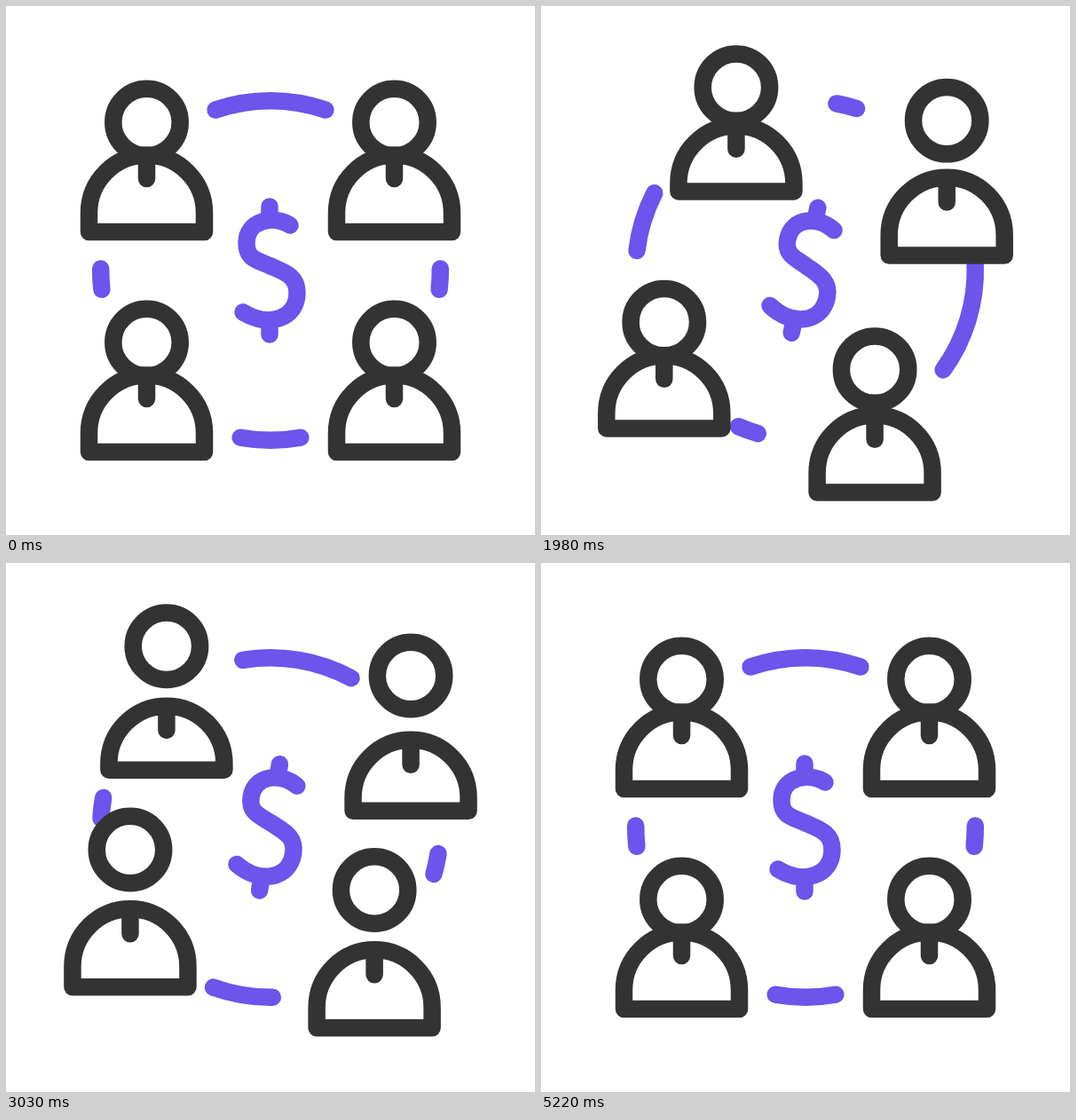
These frames come from a looping animation (596 px wide and 596 px high, 5.4 s). An HTML page with a canvas:

```html
<!DOCTYPE html>
<html lang="en">
<head>
<meta charset="utf-8">
<title>Money circle</title>
<style>
html, body { margin: 0; width: 100%; height: 100%; overflow: hidden; background: #fff; }
canvas { display: block; }
</style>
</head>
<body>
<canvas id="stage" width="596" height="596"></canvas>
<script>
const ctx = document.getElementById('stage').getContext('2d');
const SIZE = 596, MID = SIZE / 2, LOOP = 5400, STEP = 30, LAG = 300, RAD = Math.PI / 180;
const DARK = '#333333', PURPLE = '#6c54ec';

// Bezier ease with flat ends; x1 and x2 are the handle positions in time.
const ease = (x1, x2) => x => {
  let lo = 0, hi = 1;
  for (let i = 0; i < 24; i++) {
    const s = (lo + hi) / 2, r = 1 - s;
    if (3 * x1 * s * r * r + 3 * x2 * s * s * r + s * s * s < x) lo = s;
    else hi = s;
  }
  return lo * lo * (3 - 2 * lo);
};
const soft = ease(1 / 3, 2 / 3), spin = ease(.543, .581), settle = ease(.33, .45), drop = ease(.527, .862);

// Progress from 0 to 1 between two times.
const ramp = (t, from, to, curve = soft) => curve(Math.min(1, Math.max(0, (t - from) / (to - from))));

// The ring winds up, makes a full turn, overshoots and returns.
const ringAngle = t =>
  -22 * ramp(t, 0, 900) + 403.8 * ramp(t, 900, 3320, spin) - 21.8 * ramp(t, 3320, 4200);

// The dollar sign rocks from side to side, a little less each time.
function swingAngle(t) {
  const first = 1060, half = 680, count = 4;
  const peak = n => n < 0 || n >= count ? 0 : (n % 2 ? 1 : -1) * (30 - 6.7 * n);
  if (t < first) return peak(0) * ramp(t, 0, first);
  const n = Math.floor((t - first) / half), from = first + n * half;
  return peak(n) + (peak(n + 1) - peak(n)) * ramp(t, from, from + half);
}

// Each person crouches, jumps up, lands and makes a smaller second hop.
const crouch = (t, height, from, low, to) => height * (ramp(t, from, low) - ramp(t, low, to, settle));
const squash = t => crouch(t, 14, 0, 900, 1800) + crouch(t, 15.3, 2420, 3020, 3800);
const headLift = t =>
  -7.5 * ramp(t, 750, 1200) + 39.3 * ramp(t, 1200, 2250, settle) - 30.3 * ramp(t, 2500, 3300, drop)
  + 20.5 * ramp(t, 3300, 3880) - 22 * ramp(t, 3880, 4320, drop);

const dollar = new Path2D('M22-51C2-63-27-56-27-31C-27-13-16-12 0-5C16 2 30 6 30 25C30 54-2 65-31 47' +
  'M-1-72V-57M-1 56V72');

function dash(mid, half, turn) {
  ctx.beginPath();
  ctx.arc(MID, MID, 191.3, (mid - half) * RAD + turn, (mid + half) * RAD + turn);
  ctx.stroke();
}

// x, y is the middle of the base line.
function person(x, y, t) {
  const lift = headLift(t), squeeze = squash(t);
  const leg = 21.5 - squeeze + .05 * lift;
  ctx.save();
  ctx.translate(x, y);
  ctx.stroke(new Path2D(`M-65 0V${-leg}A65 65 0 0 1 65 ${-leg}V0ZM0 ${-leg - 65}V${squeeze - 60}`));
  ctx.beginPath();
  ctx.arc(0, -123.5 - lift, 37.7, 0, 2 * Math.PI);
  ctx.stroke();
  ctx.restore();
}

function draw(t) {
  const turn = ringAngle(t) * RAD, c = Math.cos(turn), s = Math.sin(turn);
  ctx.clearRect(0, 0, SIZE, SIZE);
  ctx.lineWidth = 19.5;
  ctx.lineCap = ctx.lineJoin = 'round';

  ctx.strokeStyle = PURPLE;
  dash(-90, 18.9, turn);
  dash(2.9, 3.5, turn);
  dash(90, 10.2, turn);
  dash(177.1, 3.5, turn);

  // Clockwise from the top left, each one later than the one before.
  ctx.strokeStyle = DARK;
  for (let i = 0; i < 4; i++) {
    const x = i % 3 ? 139.5 : -139.5, y = i < 2 ? -124 : 124;
    person(MID + x * c - y * s, MID + 80.5 + x * s + y * c, t - i * LAG);
  }

  ctx.strokeStyle = PURPLE;
  ctx.save();
  ctx.translate(MID, MID);
  ctx.rotate(swingAngle(t) * RAD);
  ctx.stroke(dollar);
  ctx.restore();
}

const start = performance.now();
function tick() {
  const t = (performance.now() - start) % LOOP;
  draw(Math.floor(t / STEP) * STEP);
  requestAnimationFrame(tick);
}
tick();
</script>
</body>
</html>
```
